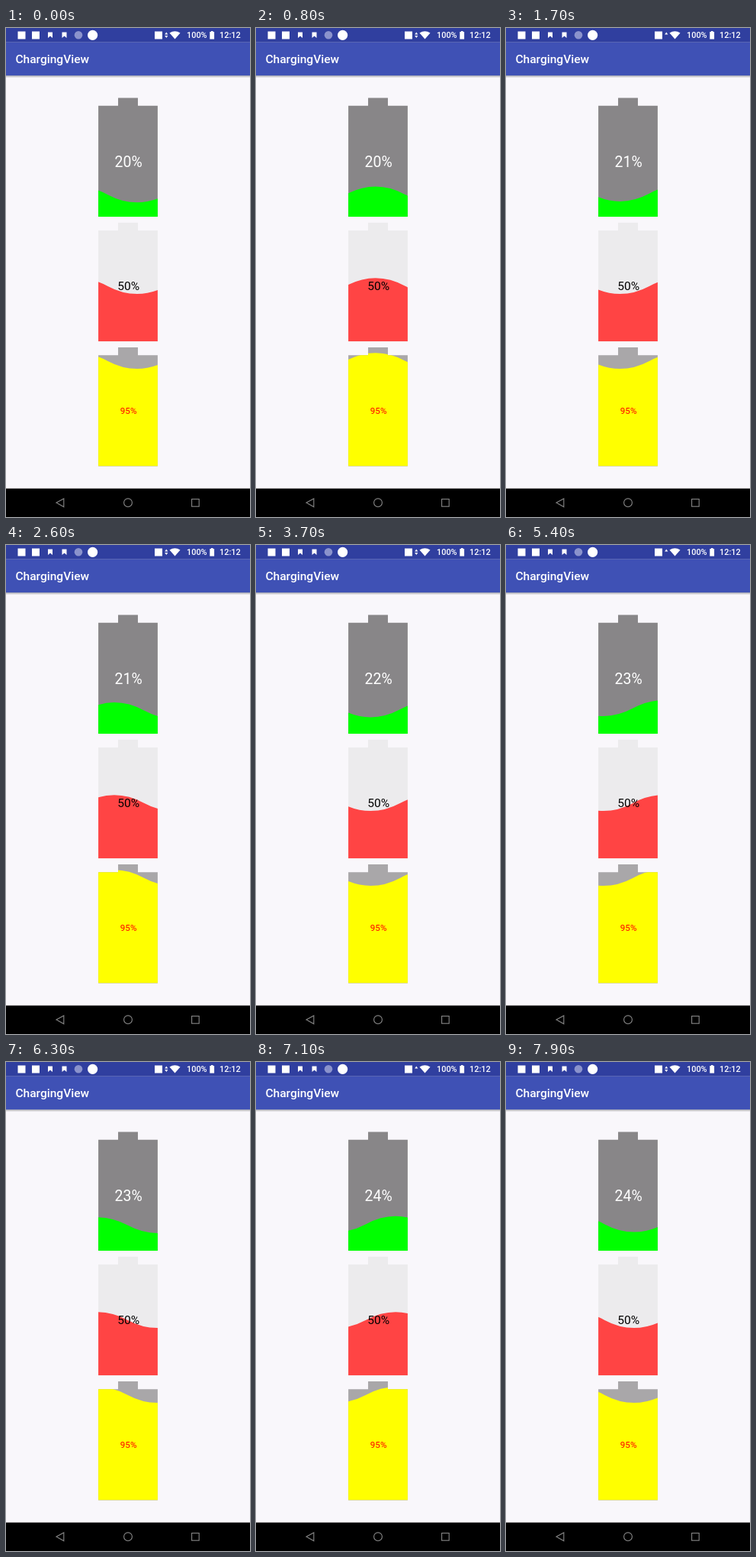
An HTML page with a canvas for the animation above (8 s loop, 320 by 640 pixels).

```html
<!DOCTYPE html>
<html lang="en">
<head>
<meta charset="utf-8">
<title>ChargingView</title>
<style>
  html, body { margin: 0; width: 100%; height: 100%; overflow: hidden; background: #f9f7fb; }
  canvas { display: block; width: 320px; height: 640px; }
</style>
</head>
<body>
<canvas id="stage"></canvas>
<script>
const LOOP = 8000, STEP = 100;
const WAVE_PERIOD = 1988, WAVE_START = 841;
const W = 77.8, H = 155.6, LEFT = 121.1, CAP = H / 15, AMP = 10.4;
const UPLOAD_ONLY = [[1200, 2200], [4200, 6100], [6800, 7500]];

const canvas = document.getElementById('stage');
const ctx = canvas.getContext('2d');
const dpr = window.devicePixelRatio || 1;
canvas.width = 320 * dpr;
canvas.height = 640 * dpr;
ctx.scale(dpr, dpr);

function rect(x, y, w, h, color) {
  ctx.fillStyle = color;
  ctx.fillRect(x, y, w, h);
}

function circle(x, y, r, color) {
  ctx.beginPath();
  ctx.arc(x, y, r, 0, Math.PI * 2);
  ctx.fillStyle = color;
  ctx.fill();
}

function poly(points, color) {
  ctx.beginPath();
  points.forEach(([x, y]) => ctx.lineTo(x, y));
  ctx.closePath();
  ctx.fillStyle = color;
  ctx.fill();
}

function text(str, x, y, size, color, weight = 400, align = 'left') {
  ctx.font = `${weight} ${size}px Roboto, sans-serif`;
  ctx.textAlign = align;
  ctx.fillStyle = color;
  ctx.fillText(str, x, y);
}

function bookmark(x) {
  poly([[x, 5.5], [x + 6, 5.5], [x + 6, 13], [x + 3, 10.5], [x, 13]], '#fff');
}

function statusBar(t) {
  rect(0, 0, 320, 18.7, '#303f9f');
  rect(15.5, 4.5, 10, 10, '#fff');
  rect(34, 4.5, 10, 10, '#fff');
  bookmark(55);
  bookmark(73.5);
  circle(95, 9.3, 5.3, '#8b93cc');
  circle(113.6, 9.3, 6.6, '#fff');
  rect(195, 4.5, 10, 10, '#fff');

  poly([[208.2, 8.6], [210.3, 5.6], [212.4, 8.6]], '#fff');
  const uploadOnly = UPLOAD_ONLY.some(([a, b]) => t >= a && t < b);
  if (!uploadOnly) poly([[208.2, 10], [212.4, 10], [210.3, 13]], '#fff');

  // wifi fan
  ctx.beginPath();
  ctx.moveTo(221.5, 14.6);
  ctx.lineTo(214.5, 6.6);
  ctx.quadraticCurveTo(221.5, 1.8, 228.5, 6.6);
  ctx.closePath();
  ctx.fillStyle = '#fff';
  ctx.fill();

  text('100%', 237, 13.4, 10.9, '#fff', 500);
  rect(267.3, 5, 5.8, 9.6, '#fff');
  rect(268.9, 4, 2.6, 1.2, '#fff');
  text('12:12', 280, 13.4, 10.9, '#fff', 500);
}

function toolbar() {
  const shade = ctx.createLinearGradient(0, 62, 0, 65.5);
  shade.addColorStop(0, 'rgba(0,0,0,.3)');
  shade.addColorStop(1, 'rgba(0,0,0,0)');
  rect(0, 62, 320, 3.5, shade);
  rect(0, 18.7, 320, 43.5, '#3f51b5');
  text('ChargingView', 12.4, 46.2, 15.55, '#fff', 500);
}

function navBar() {
  rect(0, 602.7, 320, 37.3, '#000');
  ctx.strokeStyle = '#868686';
  ctx.lineWidth = 1.1;
  ctx.beginPath();
  ctx.moveTo(66, 621.3);
  ctx.lineTo(75.8, 615.9);
  ctx.lineTo(75.8, 626.7);
  ctx.closePath();
  ctx.stroke();
  ctx.beginPath();
  ctx.arc(160, 621.3, 5.4, 0, Math.PI * 2);
  ctx.stroke();
  ctx.strokeRect(243.6, 616.6, 9.6, 9.6);
}

function battery(top, percent, shift, style) {
  const bottom = top + H;
  const level = bottom - (H - CAP) * percent / 100;
  ctx.save();
  ctx.beginPath();
  ctx.rect(LEFT + W / 3, top, W / 3, CAP + 0.1);
  ctx.rect(LEFT, top + CAP, W, H - CAP);
  ctx.fillStyle = style.empty;
  ctx.fill();
  ctx.clip();

  let x = LEFT + shift - 2 * W;
  ctx.beginPath();
  ctx.moveTo(x, bottom);
  ctx.lineTo(x, level);
  for (let i = 0; i < 4; i++, x += W) {
    const peak = level + (i % 2 ? 2 : -2) * AMP;
    ctx.quadraticCurveTo(x + W / 2, peak, x + W, level);
  }
  ctx.lineTo(x, bottom);
  ctx.closePath();
  ctx.fillStyle = style.fill;
  ctx.fill();
  ctx.restore();

  const middle = (top + CAP + bottom) / 2;
  text(percent + '%', 160.6, middle + style.size * 0.37, style.size, style.ink, 400, 'center');
}

function draw(t) {
  rect(0, 0, 320, 640, '#f9f7fb');
  toolbar();
  statusBar(t);
  const turns = (t - WAVE_START) / WAVE_PERIOD;
  const lap = Math.floor(turns);
  const shift = (turns - lap) * 2 * W;
  battery(91.4, 21 + lap, shift, { empty: '#888688', fill: '#00ff00', ink: '#fff', size: 19.44 });
  battery(254.7, 50, shift, { empty: '#ecebed', fill: '#ff4444', ink: '#000', size: 15.55 });
  battery(418, 95, shift, { empty: '#a9a7a9', fill: '#ffff00', ink: '#ff0000', size: 11.67 });
  navBar();
}

const start = performance.now();
function tick() {
  const t = (performance.now() - start) % LOOP;
  draw(Math.floor(t / STEP) * STEP);
  requestAnimationFrame(tick);
}
tick();
</script>
</body>
</html>
```
